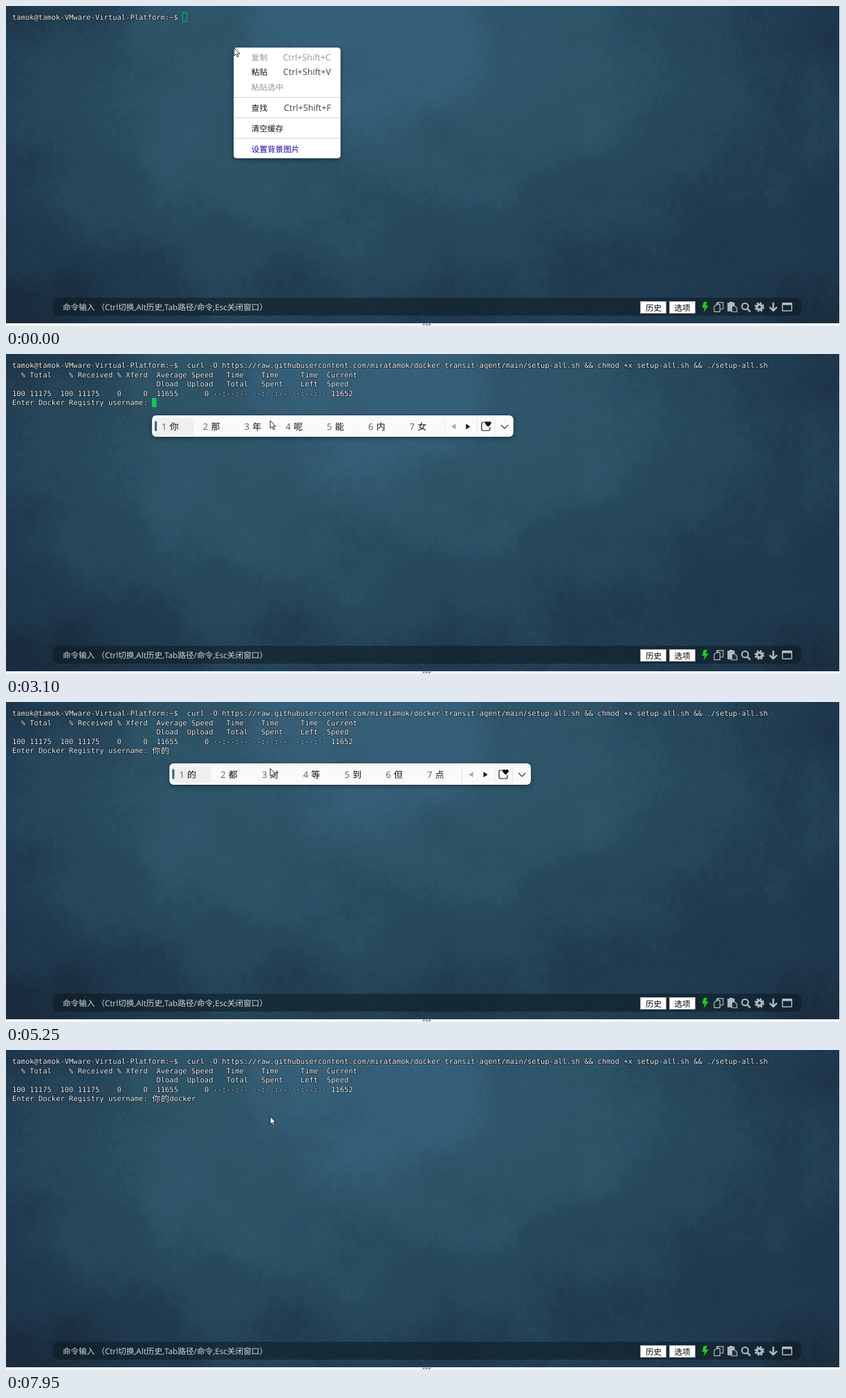
These frames come from a looping animation (1206x464 px, 8 s). An HTML page with a canvas:

```html
<!DOCTYPE html>
<html lang="zh-CN">
<head>
<meta charset="utf-8">
<title>Terminal</title>
<style>
  html, body { margin: 0; width: 100%; height: 100%; overflow: hidden; background: #f4f5f6; }
  canvas, svg { position: absolute; left: 0; top: 0; display: block; }
  text { text-rendering: geometricPrecision; white-space: pre; }
  .ui { font-family: "Open Sans", "Noto Sans CJK SC", "Noto Sans CJK", sans-serif; font-size: 11.6px; }
  .term { font-family: "DejaVu Sans Mono", "Noto Sans CJK SC", "Noto Sans CJK", monospace; font-size: 10.49px;
          fill: #ececec; stroke: #000; stroke-opacity: .5; stroke-width: 1.5px; paint-order: stroke; }
  .wide { font-size: 12.2px; }
  .pre { font-size: 11.8px; fill: #fff; stroke: none; }
  .keys { font-size: 12.6px; text-anchor: end; }
  .ime { font-size: 13px; }
  .icons { fill: none; stroke: #b3bac0; stroke-width: 1.5; }
  .menu, .panel { filter: drop-shadow(0 2px 3px rgba(0, 0, 0, .4)); }
</style>
</head>
<body>
<canvas id="wall" width="1205" height="460"></canvas>
<svg width="1206" height="464" viewBox="0 0 1206 464">
  <g fill="#8c8c8c">
    <rect x="602.5" y="460.6" width="3" height="2.4"/>
    <rect x="606.8" y="460.6" width="3" height="2.4"/>
    <rect x="611.1" y="460.6" width="3" height="2.4"/>
  </g>
  <rect x="68" y="423" width="1082" height="26" rx="8" fill="#0a161c" fill-opacity=".5"/>
  <g class="ui">
    <text x="82" y="441" fill="#d3d8db">命令输入</text>
    <text x="131.2" y="441" fill="#d3d8db" style="font-size:11.7px">（Ctrl切换,Alt历史,Tab路径/命令,Esc关闭窗口）</text>
    <g fill="#fff" stroke="#a9adb0">
      <rect x="917.5" y="428.5" width="37" height="17"/>
      <rect x="959.5" y="428.5" width="37" height="17"/>
    </g>
    <text x="936.5" y="441.6" text-anchor="middle">历史</text>
    <text x="978" y="441.6" text-anchor="middle">选项</text>
  </g>
  <path d="M1009 429H1014L1012 434.2H1016L1008.6 444.5L1010.2 437.4H1006.4Z" fill="#18d018"/>
  <g class="icons">
    <path d="M1028 433V429.8H1037V439.5H1032.5M1028 433L1031 429.8M1024 436L1027.2 432.8H1032.4V443.3H1024Z" stroke-width="1.2"/>
    <path d="M1044 431H1053V434.5H1048.5V442H1044Z" fill="#b3bac0"/>
    <path d="M1046 430H1051" stroke-width="2"/>
    <path d="M1049.5 435H1054L1057 438V443.5H1049.5Z" fill="#22313b" stroke-width="1.2"/>
    <circle cx="1068.7" cy="435.5" r="4.6" stroke-width="2"/>
    <path d="M1072 439L1076.3 443.3" stroke-width="2.4"/>
    <circle cx="1089.5" cy="436.5" r="3.7" stroke-width="3.2"/>
    <circle cx="1089.5" cy="436.5" r="6" stroke-width="2.2" stroke-dasharray="2.6 2.112"/>
    <path d="M1109.5 430V441.5M1104.2 436.6L1109.5 441.9L1114.8 436.6" stroke-width="2.4"/>
    <rect x="1122.8" y="430.8" width="13.4" height="11.2" rx="1"/>
    <path d="M1122.5 432.2H1136.5" stroke-width="3"/>
  </g>
  <g id="live"></g>
</svg>
<script>
const LOOP = 8000, CELL = 6.316, ROW = 13.5;
const PROMPT = 'tamok@tamok-VMware-Virtual-Platform:~$';
const COMMAND = 'curl -O https://raw.githubusercontent.com/miratamok/docker-transit-agent/main/setup-all.sh'
  + ' && chmod +x setup-all.sh && ./setup-all.sh';
const HEAD = [
  '  % Total    % Received % Xferd  Average Speed   Time    Time     Time  Current',
  '                                 Dload  Upload   Total   Spent    Left  Speed'
];
const START = '  0     0    0     0    0     0      0      0 --:--:-- --:--:-- --:--:--     0';
const DONE = '100 11175  100 11175    0     0  11655      0 --:--:-- --:--:-- --:--:-- 11652';
const ASK = 'Enter Docker Registry username: ';

// typed letters: extra width of the first entry, then the candidates
const phrases = ['动词', '东侧', '动车', '东城', '都成', '洞察'];
const candidates = {
  n: [0, ...'你那年呢能内女'],
  d: [0, ...'的都对等到但点'],
  do: [0, ...'都动东懂洞冬斗'],
  doc: [0, ...phrases, '动产'],
  dock: [2, 'dock', ...phrases],
  docke: [14, 'docker', ...phrases],
  docker: [20, 'dockers', ...phrases]
};

const steps = [
  [0, { menu: true, mouse: [329.5, 60.5], row: 0, col: 39, block: 'hollow' }],
  [150, { mouse: [352, 75], block: '' }],
  [270, { mouse: [373, 88], hover: true }],
  [420, { mouse: [381, 96] }],
  [570, { mouse: [383.5, 97], block: 'hollow' }],
  [720, { menu: false, command: true, col: 173, block: 'full' }],
  [1010, { mouse: [381.7, 96.2] }],
  [1440, { log: START, row: 3, col: 78 }],
  [1940, { block: '' }],
  [2090, { block: 'full' }],
  [2360, { log: DONE, ask: true, row: 4, col: 32 }],
  [3100, { ime: 'n' }],
  [3390, { pre: 'n' }],
  [3540, { ime: '', pre: '', wide: '你', col: 34 }],
  [3840, { ime: 'd' }],
  [3990, { ime: '', wide: '你的', col: 36 }],
  [5130, { ime: 'd' }],
  [5250, { block: '' }],
  [5520, { ime: 'do', pre: 'do', block: 'full' }],
  [5640, { ime: 'doc', pre: 'doc' }],
  [5760, { ime: 'dock', pre: 'dock' }],
  [6020, { ime: 'docke' }],
  [6160, { ime: 'docker', pre: 'docke', block: '' }],
  [6720, { pre: 'docker', block: 'full' }],
  [6990, { ime: '', pre: '', word: 'docker', col: 42 }],
  [7420, { col: 43 }],
  [7950, { block: '' }]
];
let last = {};
const states = steps.map(([, change]) => last = { ...last, ...change });

const cellX = col => 9 + col * CELL;
const esc = s => s.replace(/&/g, '&amp;');
const text = (x, y, s, attrs = '') => `<text x="${x}" y="${y}" ${attrs}>${esc(s)}</text>`;
const box = (x, y, w, h, attrs) => `<rect x="${x}" y="${y}" width="${w}" height="${h}" ${attrs}/>`;

// each word sits on its own terminal column
function line(row, s, col = 0) {
  const words = [...s.matchAll(/\S+/g)].map(m =>
    `<tspan x="${cellX(col + m.index).toFixed(2)}">${esc(m[0])}</tspan>`);
  return `<text class="term" y="${20.2 + row * ROW}">${words.join('')}</text>`;
}

function terminal(s) {
  let out = line(0, PROMPT);
  if (s.command) out += line(0, COMMAND, 40);
  if (s.log) out += HEAD.map((h, i) => line(i + 1, h)).join('') + line(3, s.log);
  if (s.ask) out += line(4, ASK);
  [...(s.wide || '')].forEach((c, i) =>
    out += text(cellX(32 + i * 2) + .2, 74.6, c, 'class="term wide"'));
  if (s.word) out += line(4, s.word, 36);
  const x = cellX(s.col), y = 10 + s.row * ROW;
  if (s.pre) {
    out += box(x, y, (s.pre.length + 1) * CELL, 13, 'fill="#14191d"');
    out += text(x + CELL, 74.4, s.pre, 'class="term pre"');
  }
  if (s.block === 'full') out += box(x, y - .3, CELL, 13.4, 'fill="#00d25f"');
  if (s.block === 'hollow') out += box(255.5, 9.5, 6, 13, 'fill="none" stroke="#00b469"');
  return out;
}

function menu(s) {
  const items = [
    [78.7, '复制', '#979797', 'C', '#979797'],
    [100.2, '粘贴', '#111', 'V', '#444'],
    [122, '粘贴选中', '#979797'],
    [152, '查找', '#111', 'F', '#444'],
    [182, '清空缓存', '#111'],
    [211.6, '设置背景图片', '#1406a8']
  ];
  let out = box(329.5, 60.5, 154, 160, 'rx="4" fill="#fff" stroke="#c3c7ca" class="menu"');
  if (s.hover) out += box(330, 85, 153, 22, 'fill="#e8e8e8"');
  for (const y of [132, 161.6, 191.4]) out += box(330, y, 153, 1, 'fill="#cfcfcf"');
  for (const [y, label, color, key, keyColor] of items) {
    out += text(354.8, y, label, `fill="${color}"`);
    if (key) out += text(470, y, 'Ctrl+Shift+' + key, `class="keys" fill="${keyColor}"`);
  }
  return `<g class="ui">${out}</g>`;
}

function panel(s) {
  const [extra, ...words] = candidates[s.ime];
  const width = 522.6 + extra;
  let out = box(0, 0, width, 31, 'rx="6" fill="#fafafa" class="panel"');
  out += box(4, 4, 56.5 + extra, 24, 'rx="4" fill="#efefef"');
  out += box(4, 8.3, 3, 14.5, 'rx="1.5" fill="#1d6680"');
  words.forEach((w, i) => {
    const x = 14 + i * 59.75 + (i ? extra : 0);
    out += text(x, 21.4, String(i + 1), 'fill="#5c5c5c"') + text(x + 11.6, 21.4, w, 'fill="#111"');
  });
  out += `<g transform="translate(${width} 0)">
    <path d="M-99.5 4V27M-52.5 4V27M-26.5 4V27" stroke="#e6e6e6"/>
    <path d="M-83.5 12.3V20.3L-89.5 16.3Z" fill="#a9a9a9"/>
    <path d="M-68.5 12.3V20.3L-62.5 16.3Z" fill="#111"/>
    <path d="M-40 10H-44A2 2 0 0 0-46 12V20A2 2 0 0 0-44 22H-36A2 2 0 0 0-34 20V17" fill="none" stroke="#222" stroke-width="1.2"/>
    <path d="M-36.5 16.8L-40.6 12.6A2.4 2.4 0 0 1-36.5 10A2.4 2.4 0 0 1-32.4 12.6Z" fill="#111"/>
    <path d="M-18 13.8L-12.8 19L-7.6 13.8" fill="none" stroke="#222" stroke-width="1.1"/>
  </g>`;
  return `<g class="ui ime" transform="translate(${cellX(s.col)} 89)">${out}</g>`;
}

const pointer = s => `<path transform="translate(${s.mouse})" fill="#fff" stroke="#111" stroke-width=".9"
  d="M.4 .4V11.6L3 9.2L4.9 13.3L6.7 12.5L4.9 8.6H8.4Z"/>`;

// Wallpaper: brightness levels at a few spots, blended and roughened with noise
function paintWall() {
  const spots = [
    [0, 0, 1], [100, 10, 1.5], [0, 110, 1.5], [0, 260, 1.4], [0, 350, .8], [0, 450, 0], [110, 440, .4],
    [70, 140, 2], [160, 150, 2.6], [250, 40, 3], [450, 20, 4], [600, 60, 4], [500, 140, 3.7],
    [250, 190, 3.2], [340, 260, 2.9], [480, 290, 2.6], [660, 230, 2.8], [780, 60, 3.2], [820, 150, 3],
    [920, 100, 2.7], [1000, 60, 2], [1000, 170, 2], [1100, 20, 1.5], [1200, 10, .8], [1190, 150, 1.4],
    [1060, 250, 1.5], [850, 280, 2], [600, 345, 2], [300, 340, 2], [150, 270, 2.1], [200, 410, 1.2],
    [420, 410, 1.5], [640, 430, 1.3], [860, 380, 1.2], [1050, 350, 1], [1190, 310, 1], [1190, 440, .4]
  ];
  const ramp = [[25, 43, 60], [31, 56, 77], [38, 71, 92], [46, 84, 104], [54, 95, 121]];
  const ctx = document.getElementById('wall').getContext('2d');
  const { width: W, height: H } = ctx.canvas;
  const img = ctx.createImageData(W, H);
  const hash = (x, y) => {
    let n = Math.imul(x, 374761393) + Math.imul(y, 668265263) | 0;
    n = Math.imul(n ^ n >>> 13, 1274126177);
    return ((n ^ n >>> 16) >>> 0) / 4294967296;
  };
  const ease = t => t * t * (3 - 2 * t);
  const noise = (x, y) => {
    const i = Math.floor(x), j = Math.floor(y), u = ease(x - i), v = ease(y - j);
    const a = hash(i, j), b = hash(i, j + 1);
    const top = a + (hash(i + 1, j) - a) * u, low = b + (hash(i + 1, j + 1) - b) * u;
    return top + (low - top) * v - .5;
  };
  for (let y = 0, p = 0; y < H; y++) for (let x = 0; x < W; x++, p += 4) {
    let sum = 0, total = 0;
    for (const [sx, sy, level] of spots) {
      const dx = x - sx, dy = y - sy, d = dx * dx + dy * dy + 1500, w = 1 / (d * d);
      sum += w * level;
      total += w;
    }
    const grain = hash(x + 7000, y) - .5;
    let h = sum / total + noise(x / 45, y / 45) * .4 + noise(x / 9 + 90, y / 9) * .22 + grain * .3;
    h = Math.max(0, Math.min(3.999, h));
    const k = Math.floor(h), f = ease(h - k);
    for (let c = 0; c < 3; c++)
      img.data[p + c] = ramp[k][c] + (ramp[k + 1][c] - ramp[k][c]) * f + grain * 5;
    img.data[p + 3] = 255;
  }
  ctx.putImageData(img, 0, 0);
}

const live = document.getElementById('live');
let shown = -1;
function draw(t) {
  let i = steps.length - 1;
  while (steps[i][0] > t) i--;
  if (i === shown) return;
  shown = i;
  const s = states[i];
  live.innerHTML = terminal(s) + (s.menu ? menu(s) : '') + (s.ime ? panel(s) : '') + pointer(s);
}

draw(0);
paintWall();
const begin = performance.now();
function tick() {
  draw((performance.now() - begin) % LOOP);
  requestAnimationFrame(tick);
}
requestAnimationFrame(tick);
</script>
</body>
</html>
```
